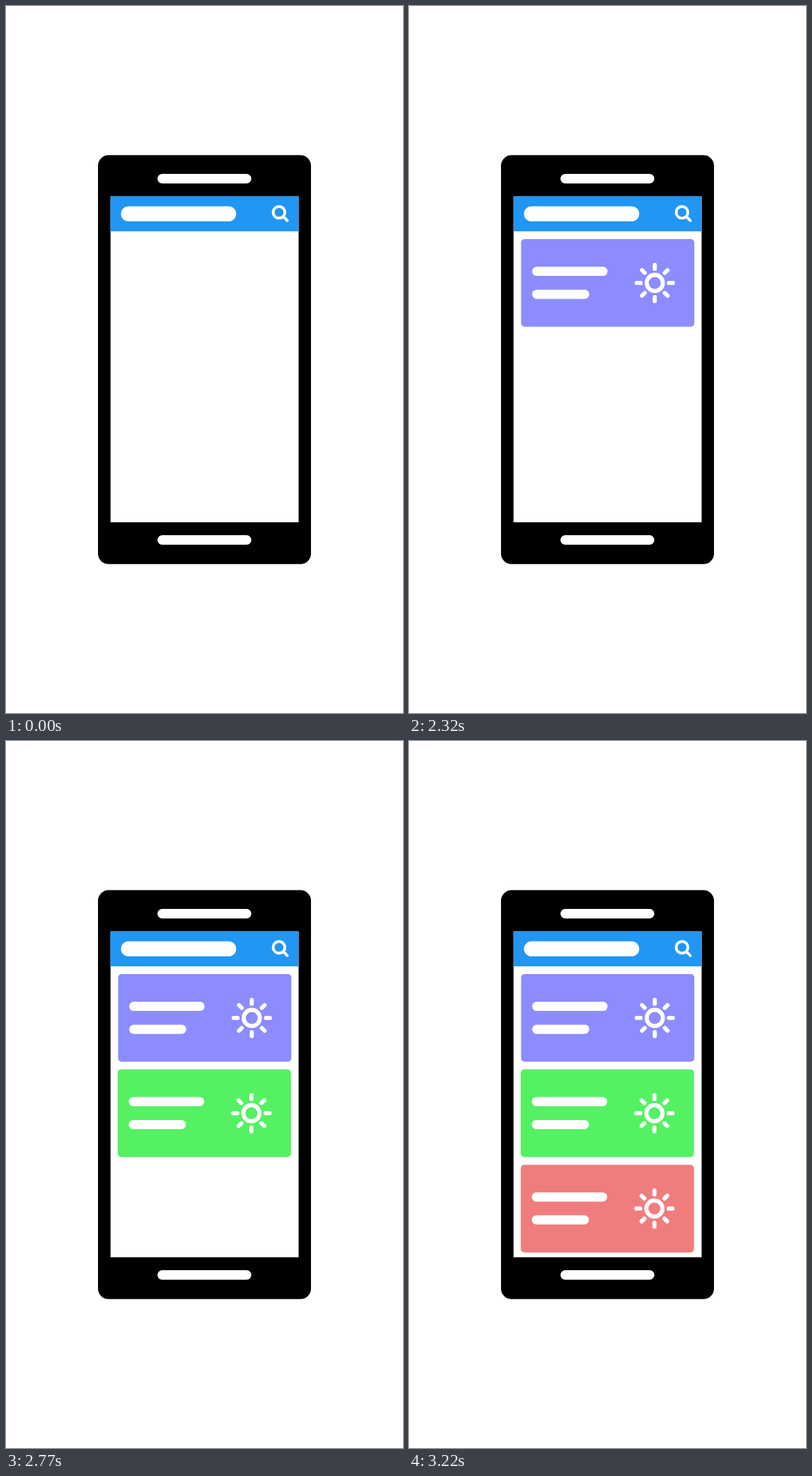
Write an HTML page that moves like this. It is 561x998 px and loops after 5220 ms.

```html
<!DOCTYPE html>
<html lang="en">
<head>
<meta charset="utf-8">
<title>Phone cards</title>
<style>
  html, body { margin: 0; width: 100%; height: 100%; overflow: hidden; background: #fff; }
  svg { display: block; width: 100%; height: 100%; }
</style>
</head>
<body>
<svg viewBox="0 0 561 998">
  <defs>
    <g id="sun" fill="none" stroke="#fff" stroke-width="5.8" stroke-linecap="round">
      <circle r="11.4"/>
      <g id="rays"></g>
    </g>
    <g id="face" fill="#fff">
      <rect x="15.6" y="39" width="106.6" height="13" rx="6.5"/>
      <rect x="15.6" y="71.3" width="80.8" height="13" rx="6.5"/>
      <use href="#sun" x="188.9" y="61.8"/>
    </g>
  </defs>
  <rect x="130" y="210.5" width="301" height="577.3" rx="15"/>
  <rect x="147.7" y="268.7" width="265.8" height="460" fill="#fff"/>
  <rect x="147.7" y="268.7" width="265.8" height="49.4" fill="#2196f3"/>
  <g fill="#fff">
    <rect x="214" y="237" width="132.7" height="13.5" rx="6.75"/>
    <rect x="214" y="747" width="132.7" height="13.5" rx="6.75"/>
    <rect x="162.5" y="282.7" width="162.8" height="21.4" rx="10.7"/>
  </g>
  <g fill="none" stroke="#fff" stroke-width="4" stroke-linecap="round">
    <circle cx="385.8" cy="291.3" r="8.3"/>
    <path d="M392.5 298 L397.5 302.9"/>
  </g>
  <g id="cards"></g>
</svg>
<script>
const NS = 'http://www.w3.org/2000/svg';
const LOOP = 5220, STEP = 30, PHASE = 10, RISE = 10;

const cards = [
  { x: 158.4, y: 329.1, color: '#8c8cff', start: 1880, span: 425, show: 1960 },
  { x: 157.9, y: 463.6, color: '#54f162', start: 2350, span: 400, show: 2380 },
  { x: 157.9, y: 598.2, color: '#f07d7d', start: 2800, span: 400, show: 2830 }
];

function add(parent, tag, attrs) {
  const el = document.createElementNS(NS, tag);
  for (const key in attrs) el.setAttribute(key, attrs[key]);
  return parent.appendChild(el);
}

const rays = document.getElementById('rays');
for (let a = 0; a < 360; a += 45) {
  add(rays, 'path', { d: 'M0 -20 V-25.6', transform: `rotate(${a})` });
}

const layer = document.getElementById('cards');
for (const card of cards) {
  card.el = add(layer, 'g', {});
  add(card.el, 'rect', { width: 244.8, height: 123.7, rx: 5, fill: card.color });
  add(card.el, 'use', { href: '#face' });
}

function draw(ms) {
  // Motion advances in fixed 30 ms steps.
  const t = Math.floor((ms % LOOP - PHASE) / STEP) * STEP + PHASE;
  for (const { el, x, y, start, span, show } of cards) {
    const p = t < show ? 0 : Math.min(1, (t - start) / span);
    el.setAttribute('opacity', p);
    el.setAttribute('transform', `translate(${x} ${y + RISE * (1 - p)})`);
  }
}

const origin = performance.now();
function tick() {
  draw(performance.now() - origin);
  requestAnimationFrame(tick);
}
draw(0);
requestAnimationFrame(tick);
</script>
</body>
</html>
```
